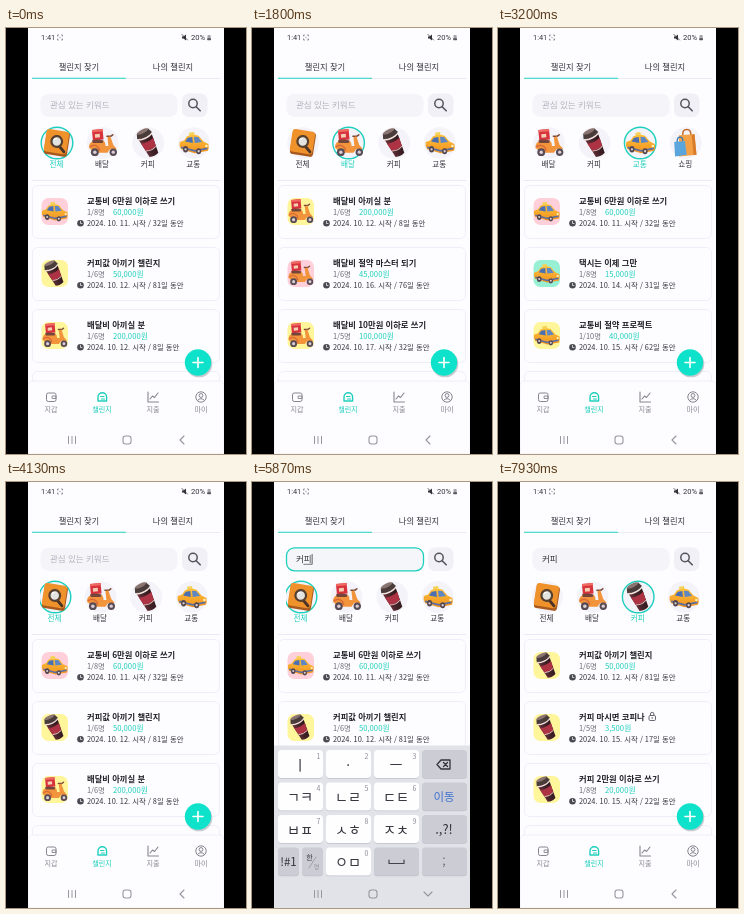
These frames come from a looping animation (240x426 px, 7.99 s). An HTML page:

```html
<!DOCTYPE html>
<html lang="ko">
<head>
<meta charset="utf-8">
<title>챌린지</title>
<style>
html, body { margin: 0; width: 100%; height: 100%; overflow: hidden; background: #000; }
svg { display: block; width: 100vw; height: 100vh; }
text { font-family: "Noto Sans CJK KR", "Noto Sans CJK", "Noto Sans", sans-serif; fill: #33333b; white-space: pre; }
</style>
</head>
<body>
<svg id="stage" viewBox="0 0 240 426" xmlns="http://www.w3.org/2000/svg">
<defs>
  <clipPath id="screen"><rect x="22" width="196" height="426"/></clipPath>
  <clipPath id="row"><rect x="34" y="96" width="172" height="50"/></clipPath>
  <linearGradient id="cupBody"><stop stop-color="#6b3038"/><stop offset=".45" stop-color="#43232a"/><stop offset="1" stop-color="#2e1619"/></linearGradient>
  <linearGradient id="cab" x2="0" y2="1"><stop stop-color="#ffc23c"/><stop offset="1" stop-color="#f0921f"/></linearGradient>
  <g id="all">
    <g transform="rotate(9)">
      <rect x="-12" y="-12" width="24" height="25" rx="3" fill="#a85a1e"/>
      <rect x="-12.5" y="-13" width="23.500" height="23.500" rx="3" fill="#f0922c"/>
      <path d="M3 3l5.500 5" stroke="#4b3328" stroke-width="3" stroke-linecap="round"/>
      <circle cx="-.5" cy="-1.500" r="5.500" fill="#e3e4e2" stroke="#56402f" stroke-width="2.300"/>
      <path d="M-3.500-2.500a3 3 0 0 1 2.500-2.300" stroke="#fff" stroke-width="1.200" fill="none"/>
    </g>
  </g>
  <g id="bike">
    <path d="M-11-13.500l11-1 1 11-11 1z" fill="#d8333d"/>
    <path d="M-11-13.500l11-1 .3 2.500-11 1z" fill="#ee6a62"/>
    <path d="M-8-9l5-.5.3 3.500-5 .5z" fill="#f6d0b4"/>
    <path d="M4.500-7h4l2-1.500" stroke="#7a4a3a" stroke-width="1.600" fill="none" stroke-linecap="round"/>
    <path d="M-14 5q0-7 6-7H1q2 1 2 5h3L5-6l3-1 3 9 3.500 4-3 1.500L8 6 5 10H-8z" fill="#f2943b"/>
    <path d="M-11-2.500q5-2 12 0l-1 2.500h-10z" fill="#74453a"/>
    <path d="M-13 4q5-4 9 1l1 3" stroke="#d9683a" stroke-width="1.500" fill="none"/>
    <g fill="#584b55"><circle cx="-8" cy="9.500" r="4"/><circle cx="11" cy="9.500" r="3.800"/></g>
    <g fill="#dccfd4"><circle cx="-8" cy="9.500" r="1.800"/><circle cx="11" cy="9.500" r="1.700"/></g>
  </g>
  <g id="cup">
    <g transform="rotate(-26)">
      <path d="M-7.500-8h15L5 13.500q-5 2-10 0z" fill="url(#cupBody)"/>
      <path d="M-7-2.500q7 2.500 14 0L5.700 6Q0 8.500-5.700 6z" fill="#ad3344"/>
      <path d="M-5.700 6.500Q0 9 5.700 6.500" stroke="#e5c9c2" stroke-width="1" fill="none"/>
      <path d="M-6.500-13.500h13l2 5q-8.500 3.500-17 0z" fill="#4a3c3b"/>
      <ellipse cy="-13.300" rx="6.500" ry="2" fill="#8a7470"/>
      <path d="M-8.300-7.500q8.300 3.500 16.600 0" stroke="#f0e4de" stroke-width="1.500" fill="none"/>
    </g>
  </g>
  <g id="taxi">
    <path d="M-5-10.500l5-.8 1 3-5.500.8z" fill="#f4d25a"/>
    <path d="M-14.500-1l4.500-1.500 3-4.500q6-2.500 12-.5l5 6 5 2.500q1 4-.5 7l-13.500 2.500-14-4q-2.500-4-1.500-7.500z" fill="url(#cab)"/>
    <path d="M-9-1.500l2.800-4 4.700-.8L-1 0z" fill="#4b6fb0"/>
    <path d="M.2-6.500l4.300.2L8.500-1 1 0z" fill="#5f87c4"/>
    <path d="M-13 4.500L1 8l13-2.500" stroke="#5a6ea6" stroke-width="1.800" fill="none"/>
    <g fill="#54464f"><ellipse cx="-8.500" cy="6.500" rx="2.600" ry="3.300"/><ellipse cx="5" cy="8.500" rx="2.600" ry="3"/></g>
    <g fill="#d8d0d0"><circle cx="-8.500" cy="6.500" r="1.200"/><circle cx="5" cy="8.500" r="1.200"/></g>
    <circle cx="13" cy="3" r="1.300" fill="#fff2b8"/>
  </g>
  <g id="bag">
    <path d="M-3-7q-1-7 4-7t4 7" stroke="#c56b2c" stroke-width="1.600" fill="none"/>
    <path d="M-7-8L9-9l2 21-18 2z" fill="#f3a046"/>
    <path d="M-12-1l11-1 2 14-12 2z" fill="#5aa6dc"/>
    <path d="M-9-1q0-5 3-5t3 4" stroke="#2d77b5" stroke-width="1.300" fill="none"/>
    <path d="M6-8.800L9-9l2 21-3 .4z" fill="#d97b2b"/>
  </g>
</defs>
<g clip-path="url(#screen)">
  <rect x="22" width="196" height="426" fill="#fdfdff"/>
  <g id="status"></g>
  <g id="search"></g>
  <g clip-path="url(#row)"><g id="cats"></g></g>
  <g id="list"></g>
  <g id="footer"></g>
  <g id="keyboard"></g>
  <g id="system"></g>
</g>
</svg>
<script>
const LOOP = 7990, TEAL = '#1fcfbd', PITCH = 45.6, GLYPH = 7.82;
const PINK = '#ffd0da', YELLOW = '#fff59a', MINT = '#98f0d4';
const $ = id => document.getElementById(id);

const text = (x, y, size, content, attrs = '') =>
  `<text x="${x}" y="${y}" font-size="${size}" ${attrs}>${content}</text>`;
const mid = (x, y, size, content, attrs = '') => text(x, y, size, content, `text-anchor="middle" ${attrs}`);
const box = (x, y, w, h, r, fill, attrs = '') =>
  `<rect x="${x}" y="${y}" width="${w}" height="${h}" rx="${r}" fill="${fill}" ${attrs}/>`;
const line = (d, color, width = 1, attrs = '') =>
  `<path d="${d}" fill="none" stroke="${color}" stroke-width="${width}" stroke-linecap="round" stroke-linejoin="round" ${attrs}/>`;
const icon = (name, x, y, scale = 1) =>
  `<use href="#${name}" transform="translate(${x} ${y}) scale(${scale})"/>`;

const item = (art, color, title, people, money, day, length, locked) =>
  ({ art, color, title, people, money, day, length, locked });
const taxiSaver = item('taxi', PINK, '교통비 6만원 이하로 쓰기', '1/8', '60,000', 11, 32);
const cupSaver = item('cup', YELLOW, '커피값 아끼기 챌린지', '1/6', '50,000', 12, 81);
const bikeSaver = item('bike', YELLOW, '배달비 아끼실 분', '1/6', '200,000', 12, 8);
const lists = {
  all: [taxiSaver, cupSaver, bikeSaver],
  bike: [bikeSaver,
    item('bike', PINK, '배달비 절약 마스터 되기', '1/6', '45,000', 16, 76),
    item('bike', YELLOW, '배달비 10만원 이하로 쓰기', '1/5', '100,000', 17, 32)],
  cup: [cupSaver,
    item('cup', YELLOW, '커피 마시면 코피나', '1/5', '3,500', 15, 17, true),
    item('cup', YELLOW, '커피 2만원 이하로 쓰기', '1/8', '20,000', 15, 22)],
  taxi: [taxiSaver,
    item('taxi', MINT, '택시는 이제 그만', '1/8', '15,000', 14, 31),
    item('taxi', YELLOW, '교통비 절약 프로젝트', '1/10', '40,000', 15, 62)],
  none: []
};
const categories = [['all', '전체'], ['bike', '배달'], ['cup', '커피'], ['taxi', '교통'], ['bag', '쇼핑']];

// Each track holds [start time, value] steps.
const selection = [[0, 'all'], [1000, 'bike'], [2070, 'cup'], [2800, 'taxi'], [3800, 'all'], [6800, 'bike'], [7400, 'cup']];
const results = [[0, 'all'], [1000, 'bike'], [2070, 'cup'], [2800, 'taxi'], [3800, 'all'], [6200, 'cup'], [6800, 'none'], [7400, 'cup']];
const typing = [[0, ''], [4700, 'ㄱ'], [4870, 'ㅋ'], [5130, 'ㅋㆍ'], [5330, '커'], [5500, '커ㅂ'], [5650, '커ㅍ'], [5800, '커피']];
const stepAt = (track, t) => track.filter(([start]) => start <= t).pop()[1];
const ease = (t, from, to) => {
  const p = Math.min(1, Math.max(0, (t - from) / (to - from)));
  return 1 - (1 - p) ** 3;
};

const cardFrame = i => box(26.5, 157.5 + i * 62, 187, 53, 5, '#fdfdff', 'stroke="#ebebf6" stroke-width=".8"');

function card({ art, color, title, people, money, day, length, locked }, i) {
  const y = 157 + i * 62;
  const lock = box(151, y + 14.5, 6.5, 5, 1.2, 'none', 'stroke="#555560" stroke-width=".9"') +
    line(`M152.500 ${y + 14.3}v-1.300a1.700 1.700 0 0 1 3.400 0v1.300M154.200 ${y + 16.5}v1`, '#555560', .9);
  return cardFrame(i) +
    box(35.5, y + 13, 26.5, 27, 7, color) + icon(art, 48.5, y + 26.5, .86) +
    text(81, y + 18.6, 8.3, title, 'font-weight="700" style="fill:#222229"') +
    text(81, y + 30, 7.4, `${people}명<tspan dx="8" font-size="7.7" font-weight="500" fill="${TEAL}" style="fill:${TEAL}">${money}원</tspan>`, 'style="fill:#686873"') +
    `<circle cx="74.500" cy="${y + 38.3}" r="3.300" fill="#4a4a52"/>` +
    line(`M74.500 ${y + 36.3}v2.200h1.500`, '#fff', .7) +
    text(81, y + 41, 7.4, `2024. 10. ${day}. 시작 / ${length}일 동안`) +
    (locked ? lock : '');
}

function drawList(key) {
  const entries = lists[key];
  return line('M26 152.500H214', '#e6e6f3', .8) + entries.map(card).join('') +
    (entries.length ? cardFrame(3) : mid(120, 166, 8.27, '챌린지가 없습니다.'));
}

function drawCategories(selected) {
  return categories.map(([name, label], i) => {
    const x = 51 + i * PITCH, on = name === selected;
    return `<circle cx="${x}" cy="115" r="15.800" fill="#f3f3f9" ${on ? `stroke="${TEAL}" stroke-width="1.400"` : ''}/>` +
      icon(name, x, 115, .97) +
      mid(x - .5, 139.4, 7.6, label, `font-weight="500" ${on ? `style="fill:${TEAL}"` : ''}`);
  }).join('');
}

function drawSearch(query, focused, composing, cursor) {
  const end = 44 + query.length * GLYPH;
  return box(34.5, 65.8, 137, 23, 8, focused ? '#f5f6fa' : '#f4f4f9', focused ? `stroke="${TEAL}" stroke-width="1.300"` : '') +
    text(44, 80.3, 8.5, query || '관심 있는 키워드', query ? '' : 'style="fill:#b3b3be"') +
    (composing ? line(`M${end - GLYPH} 82.300H${end}`, '#44444c', .7) : '') +
    (cursor ? line(`M${end + .5} 72.500V82`, '#33333b', .8) : '') +
    box(176, 65.5, 25.5, 23.5, 7, '#f0f0f6') +
    '<circle cx="187" cy="75.500" r="4.200" fill="none" stroke="#55555f" stroke-width="1.500"/>' +
    line('M190.200 78.800l4 4', '#55555f', 1.6);
}

function drawStatus() {
  return text(35, 12.2, 7.4, '1:41', 'style="font-family:Roboto,sans-serif"') +
    line('M51.500 8V7h1M55.500 7h1v1M56.500 11v1h-1M52.500 12h-1v-1M53.500 9l1 1', '#66666e', .7) +
    '<path d="M176 8.500h1.500l2.500-2v6l-2.500-2H176z" fill="#33333b"/>' + line('M176 6.500l5.500 5.500', '#33333b', .8) +
    text(185, 12.2, 7.6, '20%', 'style="font-family:Roboto,sans-serif"') +
    box(201.5, 7, 3.2, 5, .8, '#a5a5ad') + box(201.2, 10.2, 3.8, 2, .6, '#55555d') +
    mid(73, 41.8, 8.3, '챌린지 찾기', 'font-weight="500"') + mid(167, 41.8, 8.3, '나의 챌린지') +
    line('M120 50.500H214', '#e7e7f0', .8) + line('M26.500 50.300H119.500', TEAL, 1.1);
}

function drawFooter() {
  const gray = '#85858f';
  const labels = [[45, '지갑'], [96, '챌린지'], [147, '지출'], [195, '마이']];
  return '<circle cx="193" cy="336" r="13.300" fill="#b5b9bf" opacity=".75"/>' +
    '<circle cx="192" cy="334.500" r="13.200" fill="#0fe2cb"/>' + line('M187 334.500h10M192 329.500v10', '#fff', 1.6) +
    '<path d="M22 426V358q0-5 5-5H213q5 0 5 5v68z" fill="#fdfdff" stroke="#ececf4" stroke-width=".8"/>' +
    box(40.5, 365, 9.5, 8.5, 1.8, 'none', `stroke="${gray}"`) + line('M46.500 368h3.500v2.500h-3.500z', gray, .9) +
    `<path d="M92 373V369a4.300 4.300 0 1 1 8.600 0V373z" fill="none" stroke="${TEAL}" stroke-width="1.400" stroke-linejoin="round"/>` +
    line('M94.500 368.500h3.500M95.500 371h3', TEAL, 1.1) +
    line('M142 364v10h10.500M144 371l2.500-3 2 1.500 3.500-4.500', gray, 1.1) +
    `<circle cx="195" cy="369" r="5.200" fill="none" stroke="${gray}"/><circle cx="195" cy="367.500" r="1.900" fill="none" stroke="${gray}"/>` +
    line('M191.500 372.500q3.500-4 7 0', gray) +
    labels.map(([x, label], i) => mid(x, 383.6, 7.1, label, `style="fill:${i === 1 ? TEAL : gray}" font-weight="${i === 1 ? 500 : 400}"`)).join('');
}

function drawKeyboard() {
  const xs = [26, 74, 122, 170], ys = [268, 300.5, 333, 365.5];
  const rows = [['ㅣ', 'ㆍ', 'ㅡ'], ['ㄱㅋ', 'ㄴㄹ', 'ㄷㅌ'], ['ㅂㅍ', 'ㅅㅎ', 'ㅈㅊ']];
  const key = (x, y, w, gray) => box(x, y + .8, w, 28, 3.5, '#bfc0c9') + box(x, y, w, 28, 3.5, gray ? '#cccdd4' : '#fefeff');
  const letter = (x, y, label, hint) => key(x, y, 45, false) +
    mid(x + 22, y + 19.6, 14.2, label, 'font-weight="500"') + mid(x + 40.5, y + 8.6, 7, hint, 'style="fill:#8c8c96"');
  let out = box(22, 263.5, 196, 170, 0, '#e2e2e9');
  rows.forEach((row, r) => row.forEach((label, c) => out += letter(xs[c], ys[r], label, r * 3 + c + 1)));
  ys.forEach(y => out += key(170, y, 45, true));
  out += letter(74, ys[3], 'ㅇㅁ', 0) + key(26, ys[3], 21, true) + key(50, ys[3], 21, true) + key(122, ys[3], 45, true);
  return out +
    line('M185 282.500l4-4.500h9v9h-9zM191.500 280.500l4 4M195.500 280.500l-4 4', '#33333b', 1.3) +
    mid(192, 319.3, 11.5, '이동', 'style="fill:#3d72cf"') +
    mid(192, 351.8, 13, '.,?!', 'font-weight="500"') + mid(36.5, 384, 11.5, '!#1', 'font-weight="500"') +
    mid(57.5, 378, 7, '한', 'font-weight="500"') + mid(64.5, 387, 6, '영', 'style="fill:#8c8c96"') +
    line('M57 386l7-11', '#8c8c96', .7) +
    line('M137 378v3.500h15V378', '#44444c', 1.2) + mid(192, 384, 12, ';', 'style="fill:#66666e"');
}

function drawSystem(typingMode) {
  const gray = '#96969e';
  return line('M62.500 408.500v7M66 408.500v7M69.500 408.500v7', gray) +
    box(117, 408, 8, 8, 2.5, 'none', `stroke="${gray}" stroke-width="1.100"`) +
    line(typingMode ? 'M172 410l4 4 4-4' : 'M178 408l-4 4 4 4', gray, 1.1);
}

const shown = {};
function put(id, key, draw) {
  if (shown[id] === key) return;
  shown[id] = key;
  $(id).innerHTML = draw();
}

function render(t) {
  const selected = stepAt(selection, t), found = stepAt(results, t), query = stepAt(typing, t);
  const focused = t >= 4270 && t < 6130;
  const cursor = focused && (t - 4270) % 1000 < 750;
  const composing = focused && query !== '';
  const raised = ease(t, 4300, 4550) - ease(t, 6130, 6350);
  const scroll = PITCH * (ease(t, 2350, 2700) - ease(t, 3400, 3700)) + 2 * ease(t, 3400, 3700);

  put('search', [query, focused, cursor].join(), () => drawSearch(query, focused, composing, cursor));
  put('cats', selected, () => drawCategories(selected));
  put('list', found, () => drawList(found));
  put('system', raised > .5, () => drawSystem(raised > .5));
  $('cats').setAttribute('transform', `translate(${-scroll} 0)`);
  $('keyboard').setAttribute('transform', `translate(0 ${(1 - raised) * 164})`);
}

$('status').innerHTML = drawStatus();
$('footer').innerHTML = drawFooter();
$('keyboard').innerHTML = drawKeyboard();
const began = performance.now();
function tick() {
  render((performance.now() - began) % LOOP);
  requestAnimationFrame(tick);
}
tick();
</script>
</body>
</html>
```
